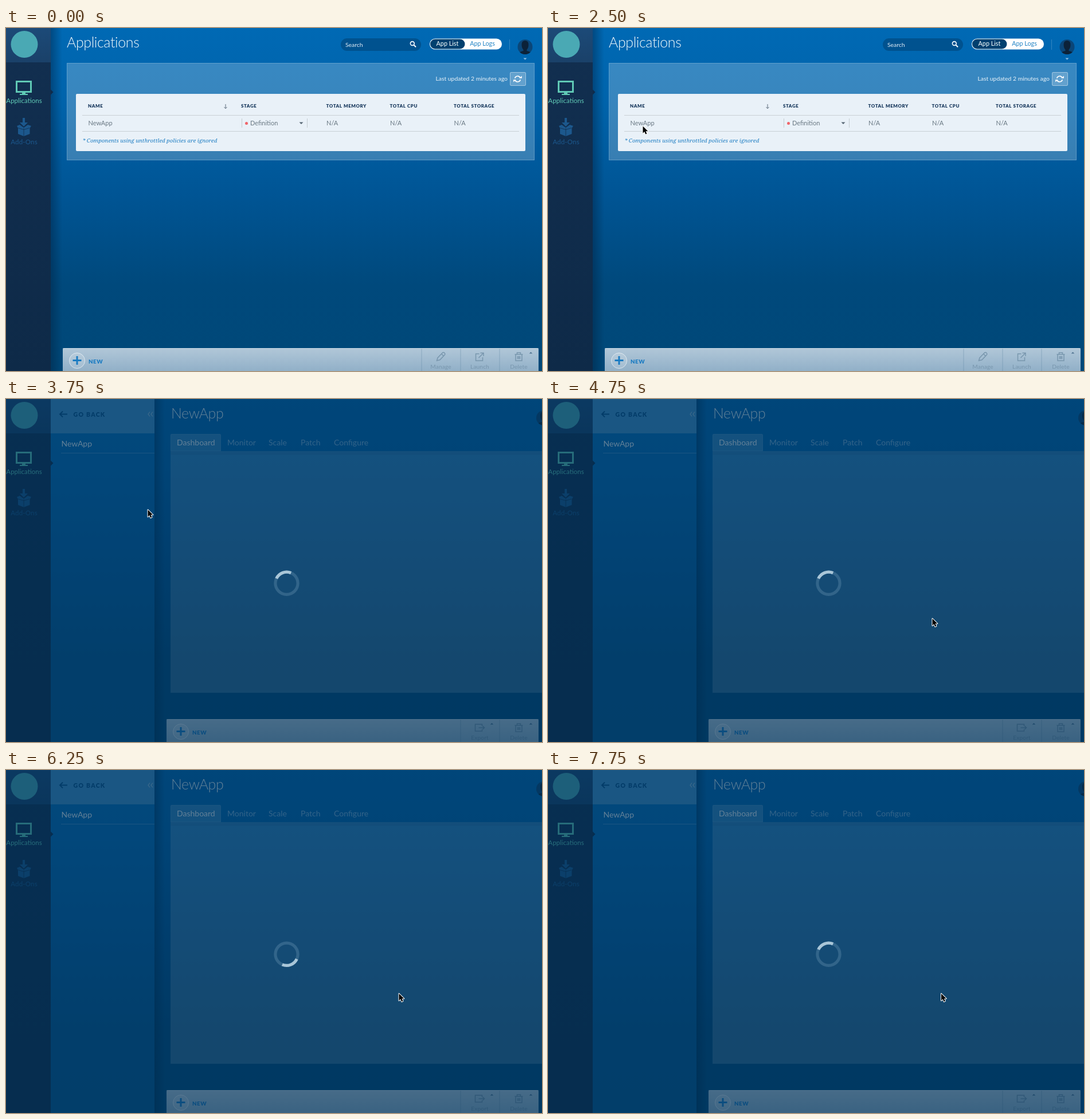
Write an HTML page with a canvas that moves like this. It is 935 px wide and 599 px high and loops after 8000 ms.

```html
<!DOCTYPE html>
<html lang="en">
<head>
<meta charset="utf-8">
<title>Applications</title>
<style>
html, body { margin: 0; width: 100%; height: 100%; overflow: hidden; background: #004878; }
canvas { display: block; }
</style>
</head>
<body>
<canvas id="stage" width="935" height="599"></canvas>
<script>
const W = 935, H = 599, LOOP = 8000, STEP = 250;
const ctx = document.getElementById('stage').getContext('2d');
const TEAL = '#60c9b5', BLUE = '#1c7cc2', NAVY = '#15365b', MUTED = '#7896ad';

// Pointer path: time, x, y
const POINTER = [
  [250, 680, 24], [500, 440, 93], [750, 95, 108], [1000, 33, 200],
  [1250, 152, 188], [1500, 172, 179], [1750, 191, 171], [2000, 191, 171],
  [2250, 180, 171], [2500, 165, 171], [2750, 165, 171], [3000, 161.5, 170],
  [3750, 247, 193], [4000, 263, 203], [4750, 670, 383], [5250, 674, 385],
  [6250, 685, 390], [8000, 685.5, 390]
];

function vGradient(y0, y1, ...colors) {
  const g = ctx.createLinearGradient(0, y0, 0, y1);
  colors.forEach((c, i) => g.addColorStop(i / (colors.length - 1), c));
  return g;
}

function box(x, y, w, h, fill, r = 0, stroke) {
  ctx.beginPath();
  ctx.roundRect(x, y, w, h, r);
  ctx.fillStyle = fill;
  ctx.fill();
  if (stroke) {
    ctx.beginPath();
    ctx.roundRect(x + .5, y + .5, w - 1, h - 1, r);
    ctx.strokeStyle = stroke;
    ctx.lineWidth = 1;
    ctx.stroke();
  }
}

function disc(x, y, r, fill) {
  ctx.beginPath();
  ctx.arc(x, y, r, 0, Math.PI * 2);
  ctx.fillStyle = fill;
  ctx.fill();
}

function text(s, x, y, size, color, weight = 400, spacing = 0, align = 'left') {
  ctx.font = `${weight} ${size}px Lato, sans-serif`;
  ctx.letterSpacing = spacing + 'px';
  ctx.textAlign = align;
  ctx.fillStyle = color;
  ctx.fillText(s, x, y);
  ctx.letterSpacing = '0px';
}

function line(d, color, width = 1) {
  ctx.strokeStyle = color;
  ctx.lineWidth = width;
  ctx.stroke(new Path2D(d));
}

function shape(d, color) {
  ctx.fillStyle = color;
  ctx.fill(new Path2D(d));
}

function caret(x, y, dir, color, r = 3) {
  shape(`M${x - r} ${y - 1.5 * dir}h${2 * r}l${-r} ${r * dir}z`, color);
}

function edgeShadow(x, width) {
  const g = ctx.createLinearGradient(x, 0, x + width, 0);
  g.addColorStop(0, 'rgba(0,30,60,.42)');
  g.addColorStop(1, 'rgba(0,30,60,0)');
  box(x, 0, width, H, g);
}

function background() {
  const g = ctx.createLinearGradient(0, 0, 0, H);
  g.addColorStop(0, '#0069b4');
  g.addColorStop(.2, '#0064ac');
  g.addColorStop(.48, '#005595');
  g.addColorStop(.75, '#00497c');
  g.addColorStop(1, '#004878');
  box(0, 0, W, H, g);
}

function navRail() {
  box(0, 0, 78, H, vGradient(0, H, '#122f50', '#0e2a48'));
  box(0, 0, 78, 60, vGradient(0, 60, '#1c4a78', '#1a4169'));
  disc(32, 28.5, 23.5, '#4aa9b4');

  line('M18.5 93.5h25v18h-25z', TEAL, 3);
  shape('M28 112h6v3h4v2h-14v-2h4z', TEAL);
  text('Applications', 31.5, 130.5, 11.5, TEAL, 400, 0, 'center');

  const dim = '#1c588d';
  shape('M29 157h4v8h5l-7 7-7-7h5z', dim);
  shape('M19 171l5-2 7 5 7-5 6 2-2.5 4v10l-10.5 4-10-4v-10z', dim);
  line('M31 175v14M21 174.5l10 3 10-3', '#12365b', 1);
  text('Add-Ons', 31.5, 202.5, 11.5, dim, 400, .2, 'center');
  shape('M78 107.5l4.5 4.5-4.5 4.5z', '#0f2b4a');
}

function avatar(x) {
  disc(x, 33, 13, '#0a4678');
  ctx.save();
  ctx.beginPath();
  ctx.arc(x, 33, 13, 0, Math.PI * 2);
  ctx.clip();
  shape(`M${x - 6} 29q0-7 6-7t6 7q0 6-3 9v2q7 1 9 6h-24q2-5 9-6v-2q-3-3-3-9z`, '#0c2238');
  ctx.restore();
  caret(x, 54, 1, '#8fbfe2', 3);
}

function toolbar() {
  box(584, 18, 140, 22, '#00528f', 11);
  text('Search', 592, 33, 10.4, '#e1eef7');
  ctx.beginPath();
  ctx.arc(708.8, 27, 3.4, 0, Math.PI * 2);
  ctx.strokeStyle = '#fff';
  ctx.lineWidth = 1.6;
  ctx.stroke();
  line('M711.4 29.6l3.6 3.6', '#fff', 2);

  box(739, 18.5, 126, 19, '#fff', 9.5);
  box(740, 19.5, 60.5, 17, '#00406f', 8.5);
  text('App List', 770, 31, 10.8, '#fff', 400, 0, 'center');
  text('App Logs', 831, 31, 10.8, '#2384c5', 400, 0, 'center');
  line('M878.5 20v18', 'rgba(255,255,255,.2)');
}

function refreshButton() {
  box(879, 77, 28, 24, 'rgba(255,255,255,.22)', 2, 'rgba(255,255,255,.4)');
  ctx.strokeStyle = '#fff';
  ctx.lineWidth = 1.7;
  for (const a of [0, Math.PI]) {
    ctx.save();
    ctx.translate(892.5, 89);
    ctx.rotate(a);
    ctx.beginPath();
    ctx.arc(0, 0, 5, Math.PI * 1.08, Math.PI * 1.88);
    ctx.stroke();
    shape('M2.8 -1.2h4.6v-4.2z', '#fff');
    ctx.restore();
  }
}

function appTable() {
  box(106, 61, 816, 170, 'rgba(255,255,255,.22)', 0, 'rgba(255,255,255,.2)');
  text('Last updated 2 minutes ago', 875, 92, 10.4, '#eaf3f9', 400, 0, 'right');
  refreshButton();
  box(122, 115, 784, 100, '#e9f1f8', 2);

  const heads = { NAME: 143, STAGE: 410, 'TOTAL MEMORY': 558.5, 'TOTAL CPU': 669.5, 'TOTAL STORAGE': 781 };
  for (const h in heads) text(h, heads[h], 138.5, 8, NAVY, 900, .55);
  line('M383 133v7.5M380.5 138l2.5 2.7 2.5-2.7', '#5a6b7a');
  line('M133 152.5h762M133 180.5h762', '#c9d0d5');

  const ink = '#687782';
  text('NewApp', 143.5, 169.5, 11, ink);
  line('M411.5 158v16M525.5 158v16', '#c3cbd1');
  disc(419.5, 166.5, 2.5, '#f0656a');
  text('Definition', 426, 169.5, 11, ink);
  caret(515, 166, 1, '#536370', 3.5);
  for (const x of [559, 670, 781.5]) text('N/A', x, 169.5, 11, ink);

  ctx.font = 'italic 9.7px "Noto Serif", serif';
  ctx.fillStyle = BLUE;
  ctx.fillText('* Components using unthrottled policies are ignored', 133.5, 199.5);
}

function action(name, x, icon, hasMenu) {
  line(`M${x - 33.5} 560v39`, 'rgba(90,130,160,.4)');
  ctx.save();
  ctx.translate(x, 574);
  line(icon, MUTED, 1.5);
  ctx.restore();
  text(name, x, 595, 10.2, MUTED, 400, .1, 'center');
  if (hasMenu) caret(x + 21, 567, -1, '#4f738f', 2.8);
}

const ICON = {
  pencil: 'M-7 7l1.5-5 8.5-9q2-1 3.5 .5t.5 3l-8.5 9zM1 -5l4 4',
  launch: 'M-1 -5h-6v12h12v-6M-2 2l8-8M1 -6.5h5.5v5.5',
  exportBox: 'M4 -3v-3h-12v12h12v-3M-2 0h10M5 -3l3 3-3 3',
  trash: 'M-7 -4h14M-3 -4v-3h6v3M-5.5 -4v11h11v-11M-2 -1v5M0 -1v5M2 -1v5'
};

function footer(x, loaded) {
  box(x, 559, 929 - x, 40, vGradient(559, H, '#b1c7d8', '#91b0c8'), [2, 2, 0, 0]);
  line(`M${x} 559.5H929`, 'rgba(255,255,255,.35)');
  const cx = x + 25;
  ctx.beginPath();
  ctx.arc(cx, 581, 13.5, 0, Math.PI * 2);
  ctx.fillStyle = 'rgba(255,255,255,.15)';
  ctx.fill();
  ctx.strokeStyle = 'rgba(255,255,255,.6)';
  ctx.lineWidth = 1;
  ctx.stroke();
  line(`M${cx - 7.5} 580.5h15M${cx} 573v15`, BLUE, 3);
  text('NEW', x + 45, 585.5, 9.8, BLUE, 900, .5);
  if (loaded) {
    action('Manage', 758.5, ICON.pencil);
    action('Launch', 826.5, ICON.launch);
  } else {
    action('Export', 826.5, ICON.exportBox, true);
  }
  action('Delete', 894.5, ICON.trash, true);
}

function pageTitle(s, x) {
  text(s, x, 33.5, 25, '#f4f9fc', 300, -.4);
}

function emptyPanel(x, y, right, bottom) {
  box(x, y, right - x, bottom - y, 'rgba(255,255,255,.2)');
  box(x, y, right - x, 5, 'rgba(0,40,80,.06)');
  line(`M${x} ${y + 5.5}H${right}`, 'rgba(0,40,80,.12)');
}

function sidePanel() {
  box(78, 0, 181, H, 'rgba(30,140,220,.2)');
  box(78, 0, 181, 60, 'rgba(255,255,255,.24)');
  const ink = '#075089';
  line('M94 26.5h13M99 21.5l-5 5 5 5', ink, 2);
  text('GO BACK', 117.5, 30.5, 10.5, ink, 900, 1.3);
  line('M251 22.5l-3 4 3 4M256 22.5l-3 4 3 4', '#9cc3de', 1.2);
  text('NewApp', 96.5, 83, 14, '#f4f9fc', 400);
  line('M96 94.5h163', 'rgba(255,255,255,.25)');
  edgeShadow(259, 18);
}

function tabs() {
  box(287, 61, 88, 30, 'rgba(255,255,255,.2)', [2, 2, 0, 0], 'rgba(255,255,255,.08)');
  text('Dashboard', 298, 81, 14, '#f4f9fc');
  const rest = { Monitor: 386, Scale: 458, Patch: 514, Configure: 572 };
  for (const t in rest) text(t, rest[t], 81, 14, '#7fb2d9');
}

function spinner(t) {
  const start = t < 3250 ? -120 : -155 + (t - 3750) * .36;
  const arc = (a, b, color) => {
    ctx.beginPath();
    ctx.arc(489.5, 321.8, 19.6, a * Math.PI / 180, b * Math.PI / 180);
    ctx.strokeStyle = color;
    ctx.lineWidth = 5.2;
    ctx.stroke();
  };
  arc(0, 360, 'rgba(170,205,225,.2)');
  arc(start, start + 88, '#a9c6d8');
}

function pointer(t) {
  const i = POINTER.findIndex(p => p[0] > t);
  if (i < 1) return;
  const [t0, x0, y0] = POINTER[i - 1], [t1, x1, y1] = POINTER[i];
  const k = (t - t0) / (t1 - t0);
  ctx.save();
  ctx.translate(x0 + (x1 - x0) * k, y0 + (y1 - y0) * k);
  const arrow = 'M.5 .5v12.2l2.8-2.6 1.9 4.4 2.2-1-1.9-4.3h3.8z';
  ctx.lineJoin = 'round';
  line(arrow, '#fff', 2);
  shape(arrow, '#000');
  ctx.restore();
}

function draw(t) {
  const loading = t >= 3000, open = t >= 3500;
  background();
  if (open) {
    sidePanel();
    pageTitle('NewApp', 288);
    tabs();
    emptyPanel(287, 91, W, 513);
    avatar(938);
  } else {
    edgeShadow(78, 20);
    pageTitle(loading ? 'NewApp' : 'Applications', 106);
    avatar(905.5);
    if (loading) emptyPanel(106, 61, 922, 484);
    else {
      toolbar();
      appTable();
    }
  }
  footer(open ? 280 : 99, !loading);
  navRail();
  if (loading) {
    box(0, 0, W, H, 'rgba(0,48,84,.6)');
    spinner(t);
  }
  pointer(t);
}

function tick() {
  const t = performance.now() % LOOP;
  draw(Math.floor(t / STEP) * STEP);
  requestAnimationFrame(tick);
}
tick();
</script>
</body>
</html>
```
